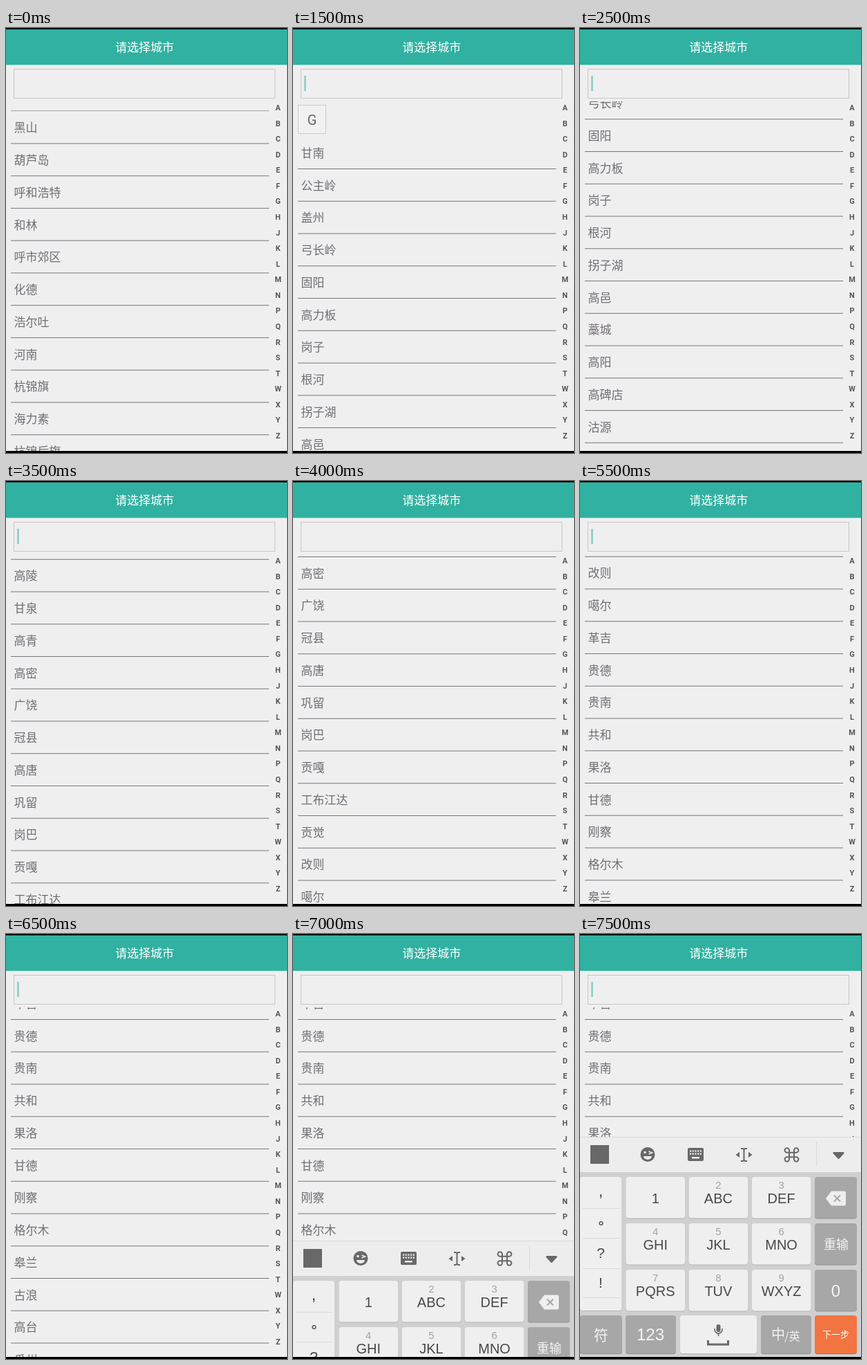
Recreate the animation shown at these times as an HTML page. Size 407 by 614 pixels, loop 8 s.

```html
<!DOCTYPE html>
<html lang="zh-CN">
<head>
<meta charset="utf-8">
<title>城市列表</title>
<style>
html, body { margin: 0; width: 100%; height: 100%; overflow: hidden; background: #efefef; }
svg { display: block; width: 407px; height: 614px; }
.cjk { font-family: "Noto Sans CJK SC", "Noto Sans CJK", sans-serif; }
.key { font-family: "Liberation Sans", Arial, sans-serif; }
.index { font-family: Roboto, sans-serif; font-weight: 700; }
</style>
</head>
<body>
<svg viewBox="0 0 407 614" xmlns="http://www.w3.org/2000/svg">
  <defs>
    <clipPath id="listClip"><rect y="106" width="407" height="505"/></clipPath>
    <clipPath id="screenClip"><rect width="407" height="611"/></clipPath>
  </defs>
  <rect width="407" height="614" fill="#efefef"/>
  <rect y="2" width="407" height="51" fill="#31b1a1"/>
  <rect y="53" width="407" height="1" fill="#b5dfd8"/>
  <rect x="11.5" y="59.5" width="378" height="42" fill="none" stroke="#c6c6c6"/>
  <rect id="cursor" x="16.3" y="69" width="2.4" height="22" fill="#82ccc1"/>
  <g id="list" clip-path="url(#listClip)"></g>
  <g id="letters"></g>
  <g clip-path="url(#screenClip)"><g id="keyboard"></g></g>
  <rect width="407" height="2" fill="#000"/>
  <rect y="611" width="407" height="3" fill="#000"/>
</svg>
<script>
const NS = 'http://www.w3.org/2000/svg';
const byId = id => document.getElementById(id);
const LOOP = 8000, STEP = 500, PITCH = 46.75;

function add(parent, tag, attrs, text) {
  const el = document.createElementNS(NS, tag);
  for (const k in attrs) el.setAttribute(k, attrs[k]);
  if (text !== undefined) el.textContent = text;
  parent.appendChild(el);
  return el;
}

// Places text so that its glyphs are centred vertically on y.
function label(parent, text, x, y, size, fill, cls = 'cjk', anchor = 'middle') {
  const drop = cls === 'cjk' ? 0.38 : 0.36;
  return add(parent, 'text', {
    x, y: y + size * drop, 'font-size': size, fill, class: cls, 'text-anchor': anchor
  }, text);
}

const svg = document.querySelector('svg');
label(svg, '请选择城市', 200.7, 28, 17, '#fff');

[...'ABCDEFGHJKLMNPQRSTWXYZ'].forEach((c, i) =>
  label(byId('letters'), c, 394, 115 + i * 22.57, 11, '#555', 'index'));

// City lists
function cityGroup(names, firstY) {
  const g = add(byId('list'), 'g', {});
  names.split(' ').forEach((name, i) => {
    const y = firstY + i * PITCH;
    label(g, name, 11.5, y, 17, '#716d75', 'cjk', 'start');
    add(g, 'rect', { x: 7, y: y + 22.6, width: 374, height: 1, fill: '#79767c' });
  });
  return g;
}

const groupH = cityGroup('黑山 葫芦岛 呼和浩特 和林 呼市郊区 化德 浩尔吐 河南 杭锦旗 海力素 杭锦后旗', 143.8);
add(groupH, 'rect', { x: 7, y: 119.1, width: 374, height: 1, fill: '#a09da2' });

const groupG = cityGroup(
  '甘南 公主岭 盖州 弓长岭 固阳 高力板 岗子 根河 拐子湖 高邑 藁城 高阳 高碑店 沽源 ' +
  '固安 故城 广宗 馆陶 古交 广灵 高陵 甘泉 高青 高密 广饶 冠县 高唐 巩留 岗巴 贡嘎 ' +
  '工布江达 贡觉 改则 噶尔 革吉 贵德 贵南 共和 果洛 甘德 刚察 格尔木 皋兰 古浪 高台 瓜州', 180.4);
add(groupG, 'rect', { x: 7.5, y: 111.5, width: 40, height: 41, fill: '#f1f1f1', stroke: '#cacaca' });
label(groupG, 'G', 27.5, 132.5, 20, '#666', 'index').style.fontWeight = 400;

// Keyboard
const kb = byId('keyboard');
const LIGHT = '#efefef', GREY = '#a7a7a7', INK = '#484848', ICON = '#686868';
add(kb, 'rect', { y: 293, width: 407, height: 51, fill: '#ededed' });
add(kb, 'rect', { y: 293, width: 407, height: 1, fill: '#d9d9d9' });
add(kb, 'rect', { y: 344, width: 407, height: 270, fill: '#d0d0d0' });

function key(x, y, w, h, fill = LIGHT) {
  const shade = fill === LIGHT ? '#b4b4b4' : fill === GREY ? '#929292' : '#d4602f';
  add(kb, 'rect', { x, y: y + 1, width: w, height: h, rx: 4, fill: shade });
  add(kb, 'rect', { x, y, width: w, height: h, rx: 4, fill });
}
const stroke = (d, width = 2, color = ICON) =>
  add(kb, 'path', { d, fill: 'none', stroke: color, 'stroke-width': width });
const shape = (d, fill = ICON) => add(kb, 'path', { d, fill });

// Toolbar icons
add(kb, 'rect', { x: 15, y: 305, width: 27, height: 27, fill: ICON });
add(kb, 'circle', { cx: 98, cy: 318.5, r: 10.5, fill: ICON });
add(kb, 'circle', { cx: 94, cy: 315.5, r: 1.8, fill: '#ededed' });
stroke('M99.5 314l5 2l-5 2', 1.5, '#ededed');
shape('M92 321h12a6 5 0 0 1-12 0z', '#ededed');
add(kb, 'rect', { x: 156, y: 309, width: 23, height: 19, rx: 2, fill: ICON });
for (let i = 0; i < 10; i++)
  add(kb, 'rect', { x: 159 + (i % 5) * 3.7, y: 312.5 + (i / 5 | 0) * 4, width: 2.2, height: 2.2, fill: '#ededed' });
add(kb, 'rect', { x: 162, y: 322, width: 11, height: 2.5, fill: '#ededed' });
stroke('M233 310h3l1.5 1.5l1.5-1.5h3M233 328h3l1.5-1.5l1.5 1.5h3M237.5 311v16');
shape('M225.5 319l5.5-4v8zM249.5 319l-5.5-4v8z');
stroke('M303 315.5v-3a3.2 3.2 0 1 0-3.2 3.2h13.4a3.2 3.2 0 1 0-3.2-3.2v13a3.2 3.2 0 1 0 3.2-3.2h-13.4a3.2 3.2 0 1 0 3.2 3.2z');
add(kb, 'rect', { x: 342, y: 300, width: 1, height: 36, fill: '#dadada' });
shape('M367 315h15q1.5 1 0 2.5l-6.5 7q-1 1-2 0l-6.500-7q-1.500-1.500 0-2.500z');

// Punctuation column
key(0, 351, 60, 193);
[396, 439, 483, 525].forEach(y =>
  add(kb, 'rect', { x: 4, y, width: 53, height: 1, fill: '#d9d9d9' }));
label(kb, ',', 30, 370, 24, INK, 'key');
add(kb, 'circle', { cx: 30.5, cy: 418, r: 2.4, fill: 'none', stroke: INK, 'stroke-width': 1.3 });
label(kb, '?', 30, 460, 21, INK, 'key');
label(kb, '!', 30, 503, 21, INK, 'key');

// Number pad
['1', 'ABC', 'DEF', 'GHI', 'JKL', 'MNO', 'PQRS', 'TUV', 'WXYZ'].forEach((text, i) => {
  const x = 66.5 + (i % 3) * 91.2, y = 351 + (i / 3 | 0) * 67;
  key(x, y, 85.5, 59.5);
  label(kb, text, x + 42.7, y + 31, 20, INK, 'key');
  if (i) label(kb, i + 1, x + 42.7, y + 11.5, 15, '#a4a4a4', 'key');
});
for (let r = 0; r < 3; r++) key(340, 351 + r * 67, 61, 59.5, GREY);
shape('M356 382l8-10.500h19q2 0 2 2v17q0 2-2 2h-19z', LIGHT);
stroke('M368 377.500l9 9m0-9l-9 9', 2, GREY);
label(kb, '重输', 371, 448, 18, '#f3f3f3');
label(kb, '0', 370.5, 515, 24, '#f3f3f3', 'key');

// Bottom row
key(0, 551, 61, 55, GREY);
key(66, 551, 73, 55, GREY);
key(145, 551, 111, 55);
key(262, 551, 73, 55, GREY);
key(340, 551, 61, 55, '#f27440');
label(kb, '符', 30.5, 579, 21, '#f3f3f3');
label(kb, '123', 102, 578.5, 24, '#f3f3f3', 'key');
label(kb, '中', 287, 578.5, 20, '#f3f3f3');
label(kb, '/英', 307.5, 580.5, 16, '#f3f3f3');
label(kb, '下一步', 370.5, 578.5, 13, '#fff');
add(kb, 'rect', { x: 197.5, y: 564, width: 6, height: 11, rx: 3, fill: ICON });
stroke('M195 570v1.500a5.500 5.500 0 0 0 11 0v-1.500M200.500 577v4', 1.6);
stroke('M185.500 587v6h29v-6', 3);

// Scroll offset of the G list per half second; null shows the H list.
const SCROLL = [null, null, null, 0, 0, 212, 663, 978.5, 1122.5, 1275.5,
  1321.5, 1543.5, 1669.5, 1669.5, 1669.5, 1669.5];

function render(ms) {
  const step = Math.floor((ms % LOOP) / STEP);
  const scroll = SCROLL[step];
  const show = (el, on) => el.setAttribute('visibility', on ? 'visible' : 'hidden');
  show(byId('cursor'), step % 2 === 1);
  show(groupH, scroll === null);
  show(groupG, scroll !== null);
  groupG.setAttribute('transform', `translate(0 ${-(scroll || 0)})`);
  show(kb, step >= 14);
  kb.setAttribute('transform', `translate(0 ${step === 14 ? 150 : 0})`);
}

const start = performance.now();
function tick() {
  render(performance.now() - start);
  requestAnimationFrame(tick);
}
tick();
</script>
</body>
</html>
```
